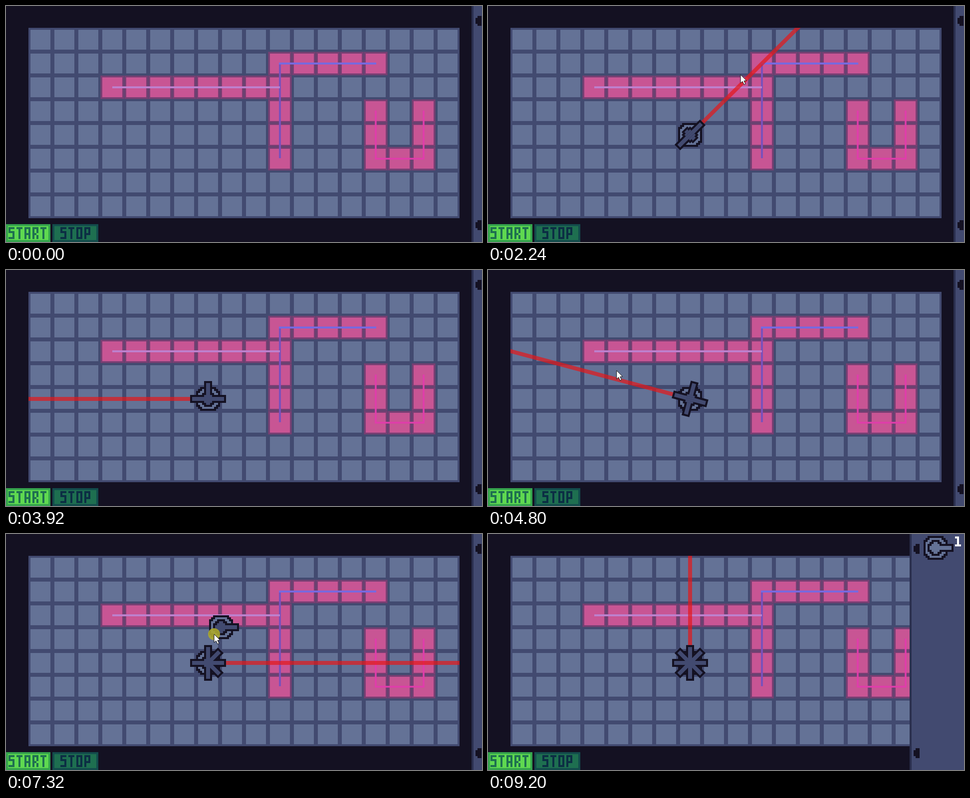
Recreate the animation shown at these times as an HTML page with a canvas. Size 954 by 476 pixels, loop 9440 ms.

```html
<!DOCTYPE html>
<html lang="en">
<head>
<meta charset="utf-8">
<title>Turret merge</title>
<style>
html, body { margin: 0; width: 100%; height: 100%; overflow: hidden; background: #141122; }
canvas { display: block; }
</style>
</head>
<body>
<canvas id="stage" width="954" height="476" role="img" aria-label="START STOP"></canvas>
<script>
const ctx = document.getElementById('stage').getContext('2d');
const LOOP = 9440, PX = 4, CELL = 48;
const BOARD = { x: 45, y: 44, cols: 18, rows: 8 };
const HOME = [405, 260], ICON = [897, 28], EDGE = [953, 75], AWAY = [990, 75];
const DARK = '#141122', SLATE = '#424a70', TILE = '#647296', SHADE = '#2a2f4e';

// Each turret: time of the drop, heading it is aimed at afterwards (degrees).
const drops = [
  [740, -135], [2060, 45], [3160, 180], [4420, 201.2],
  [5460, 90], [6600, 360], [7400, 180], [8440, 270]
].map(([drop, aim], i) => ({
  drop, aim, open: drop - 480,
  via: i === 6 ? [431, 188] : [467, 236],
  grip: i === 6 ? [-14, 14] : [0, 2]
}));
drops[0].open = 40;
const LAST_OPEN = 8980;
const BARRELS = [0, 180, 90, -90, -45, 45, 135, -135];

const GLYPHS = {
  S: '111 100 111 001 001 111', T: '111 010 010 010 010 010',
  A: '111 101 101 111 101 101', R: '111 101 101 110 101 101',
  O: '111 101 101 101 101 111', P: '111 101 101 111 100 100',
  1: '110 010 010 010 111'
};

const rad = deg => deg * Math.PI / 180;
const part = (t, a, b) => Math.min(1, Math.max(0, (t - a) / (b - a)));
const mix = (a, b, p) => a + (b - a) * p;
const mixPt = (a, b, p) => [mix(a[0], b[0], p), mix(a[1], b[1], p)];
const smooth = p => p * p * (3 - 2 * p);

function rect(x, y, w, h, color) {
  ctx.fillStyle = color;
  ctx.fillRect(x, y, w, h);
}

function line(points, color, width) {
  ctx.strokeStyle = color;
  ctx.lineWidth = width;
  ctx.beginPath();
  points.forEach(p => ctx.lineTo(...p));
  ctx.stroke();
}

function pixelText(text, x, y, color) {
  [...text].forEach((ch, i) => GLYPHS[ch].split(' ').forEach((row, r) =>
    [...row].forEach((bit, c) => {
      if (bit === '1') rect(x + i * 16 + c * PX, y + r * PX, PX, PX, color);
    })));
}

// Stepped octagon made of square pixels.
function octagon(x, y, half, color) {
  for (let d = 0; d < half * 2; d += PX) {
    const inset = Math.max(0, 8 - d, 8 - (half * 2 - PX - d));
    rect(x - half + inset, y - half + d, 2 * (half - inset), PX, color);
  }
}

function turret(x, y, heading, count, metal = SLATE) {
  octagon(x, y, 24, DARK);
  octagon(x, y, 20, TILE);
  ctx.save();
  ctx.translate(x, y);
  ctx.rotate(rad(heading));
  for (const [inset, color] of [[0, DARK], [PX, metal]]) {
    octagon(0, 0, 16 - inset, color);
    for (const turn of BARRELS.slice(0, count)) {
      ctx.save();
      ctx.rotate(rad(turn));
      rect(8, inset - 8, 28 - inset, 16 - 2 * inset, color);
      ctx.restore();
    }
  }
  ctx.restore();
}

function walls() {
  const cells = [];
  for (let c = 3; c <= 10; c++) cells.push([c, 2]);
  for (let c = 10; c <= 14; c++) cells.push([c, 1]);
  for (let r = 3; r <= 5; r++) cells.push([10, r], [14, r], [16, r]);
  cells.push([15, 5]);
  const each = (grow, color) => cells.forEach(([c, r]) => rect(
    BOARD.x + c * CELL + PX - grow, BOARD.y + r * CELL + PX - grow,
    40 + 2 * grow, 40 + 2 * grow, color));
  each(4, '#5f446f');
  each(3, '#783f73');
  each(0, '#c85594');
  line([[549, 116], [549, 307]], '#7a50bb', 4);
  line([[547, 116], [742, 116]], '#7869df', 4);
  line([[213, 164], [549, 164]], '#bd80cd', 4);
  line([[741, 211], [741, 308], [837, 308], [837, 211]], '#e03dab', 3.5);
}

function board() {
  const { x, y, cols, rows } = BOARD;
  rect(x, y, cols * CELL, rows * CELL, SLATE);
  for (let r = 0; r < rows; r++)
    for (let c = 0; c < cols; c++)
      rect(x + c * CELL + PX, y + r * CELL + PX, 40, 40, TILE);
  walls();
}

function laser(heading) {
  const [x, y] = HOME, dx = Math.cos(rad(heading)), dy = Math.sin(rad(heading));
  ctx.save();
  ctx.beginPath();
  ctx.rect(BOARD.x, BOARD.y, BOARD.cols * CELL, BOARD.rows * CELL);
  ctx.clip();
  line([[x + dx * 35, y + dy * 35], [x + dx * 900, y + dy * 900]],
    'rgba(229,23,25,.7)', 8);
  ctx.restore();
}

function panel(slide, stocked) {
  const x = 937 - slide;
  rect(x - PX, 0, PX, 476, SHADE);
  rect(x, 0, 954 - x, 476, SLATE);
  for (const y of [20, 432]) {
    rect(x + 4, y + 4, 4, 12, DARK);
    rect(x + 8, y, 8, 20, DARK);
  }
  if (stocked) {
    turret(x + 48, 28, 0, 1, TILE);
    pixelText('1', x + 87, 5, '#fff');
  }
}

function button(text, x, w, textX, fill, edge, ink) {
  rect(x, 440, w, 36, edge);
  rect(x + PX, 444, w - 2 * PX, 28, fill);
  pixelText(text, textX, 446, ink);
}

function pointer([x, y], pressed) {
  if (pressed) {
    ctx.fillStyle = 'rgba(172,169,45,.9)';
    ctx.beginPath();
    ctx.arc(x, y, 12, 0, 7);
    ctx.fill();
  }
  const shape = [[0, 0], [0, 17], [4, 13.5], [7, 20], [10, 18.5], [7, 12.5], [12, 12]];
  ctx.beginPath();
  shape.forEach(([dx, dy]) => ctx.lineTo(x + dx, y + dy));
  ctx.closePath();
  ctx.fillStyle = '#fff';
  ctx.strokeStyle = '#111';
  ctx.lineWidth = 1;
  ctx.fill();
  ctx.stroke();
}

// Picture state that follows from the time alone.
function stateAt(t) {
  const count = drops.filter(d => t >= d.drop).length;
  const last = drops[count - 1], next = drops[count];
  const open = next ? next.open : LAST_OPEN;
  const s = { count, heading: 0, slide: 0, stocked: true };

  if (last) {
    const from = count > 1 ? drops[count - 2].aim : 0;
    const g = part(t, last.drop, open);
    const bearing = mix(from, last.aim, smooth(part(g, .05, .55)));
    s.heading = Math.round(bearing / 15) * 15;
    if (g < .82) {
      const reach = 158 * smooth(part(g, 0, .2));
      const at = [HOME[0] + reach * Math.cos(rad(bearing)),
                  HOME[1] + reach * Math.sin(rad(bearing))];
      s.cursor = mixPt(at, AWAY, smooth(part(g, .7, .82)));
    }
  }

  if (t >= open) {
    s.slide = 88 * part(t, open, open + 176);
    if (next) {
      const grab = open + 200;
      s.slide *= 1 - part(t, grab + 40, grab + 180);
      s.pressed = true;
      if (t < grab) {
        const hand = [ICON[0] + next.grip[0], ICON[1] + next.grip[1]];
        s.cursor = mixPt(EDGE, hand, smooth(part(t, open + 40, grab)));
      } else {
        const near = next.drop - 80;
        s.stocked = false;
        s.held = t < near
          ? mixPt(ICON, next.via, part(t, grab, near))
          : mixPt(next.via, HOME, part(t, near, next.drop));
        s.cursor = [s.held[0] + next.grip[0], s.held[1] + next.grip[1]];
      }
    }
  }
  s.slide = Math.round(s.slide / PX) * PX;
  return s;
}

function draw(t) {
  const s = stateAt(t);
  rect(0, 0, 954, 476, DARK);
  board();
  if (s.count) {
    laser(s.heading);
    turret(...HOME, s.heading, s.count);
  }
  button('START', 0, 89, 5, '#5fd950', '#35a44d', '#1e6f50');
  button('STOP', 93, 92, 109, '#1e6f50', '#134c4c', '#0c2e44');
  panel(s.slide, s.stocked);
  if (s.held) turret(...s.held.map(Math.round), 0, 1);
  if (s.cursor) pointer(s.cursor, s.pressed);
}

const start = performance.now();
function tick() {
  const t = (performance.now() - start) % LOOP;
  draw(Math.floor(t / 40) * 40);
  requestAnimationFrame(tick);
}
tick();
</script>
</body>
</html>
```
